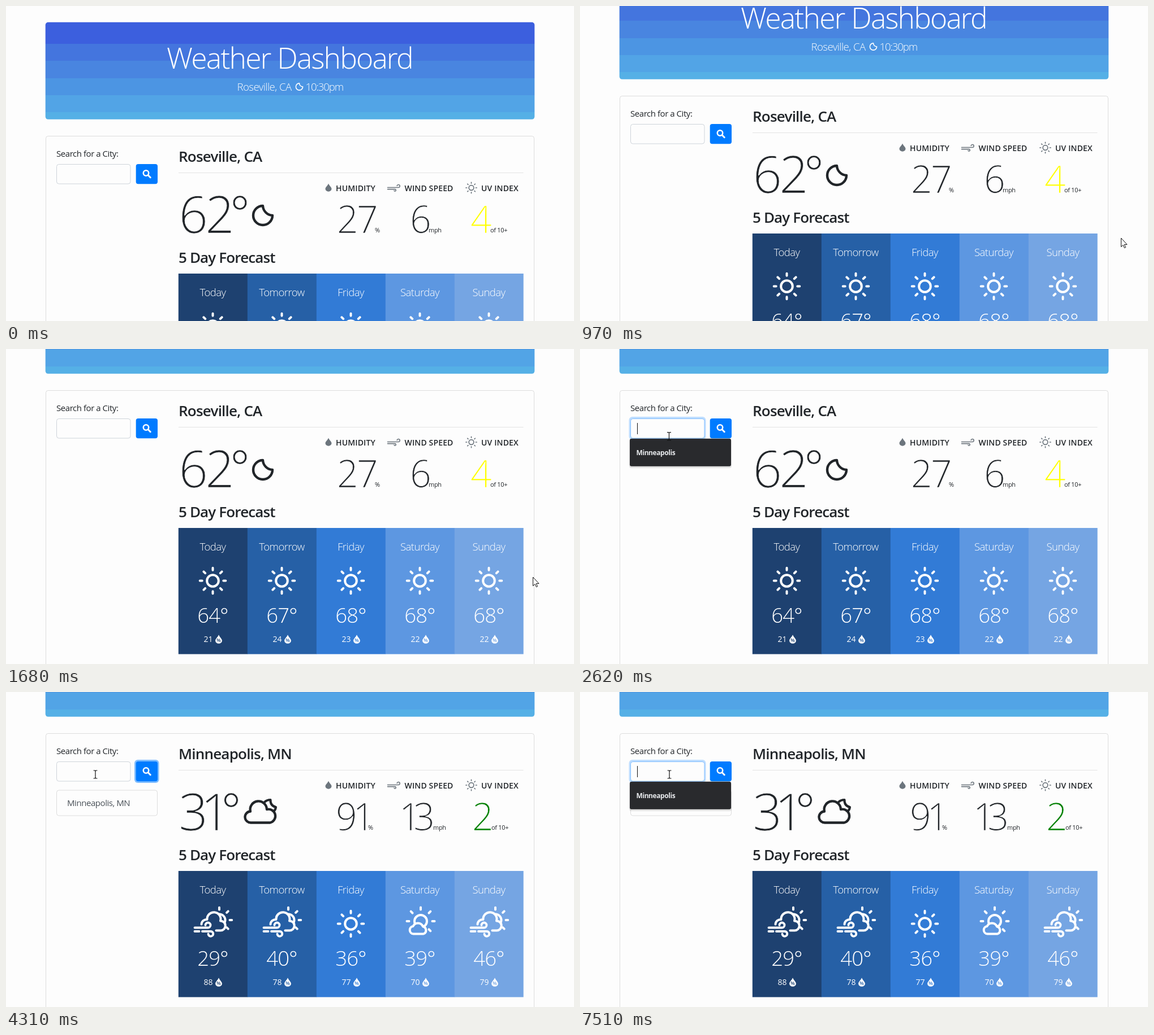
These frames come from a looping animation (1004x558 px, 8000 ms). An HTML page:

```html
<!DOCTYPE html>
<html lang="en">
<head>
<meta charset="utf-8">
<title>Weather Dashboard</title>
<style>
  html, body { margin: 0; width: 100%; height: 100%; overflow: hidden; background: #fdfdfd; }
  svg { display: block; width: 1004px; height: 558px; }
  text { font-family: "Open Sans", "Noto Sans", sans-serif; letter-spacing: -.03em; white-space: pre; }
  .line { fill: none; stroke-linecap: round; stroke-linejoin: round; }
  .thin text { stroke: #fdfdfd; stroke-width: .7px; }
  .off { display: none; }
</style>
</head>
<body>
<svg id="stage" viewBox="0 0 1004 558"></svg>
<script>
const LOOP = 8000;
const INK = '#212529', GREY = '#6c757d';
const COLS = ['#1e4170', '#2660a6', '#327bd6', '#5d97e1', '#75a5e3'];
const DAYS = ['Today', 'Tomorrow', 'Friday', 'Saturday', 'Sunday'];

const text = (x, y, str, size, o = {}) =>
  `<text x="${x}" y="${y}" font-size="${size}" font-weight="${o.w || 400}" fill="${o.fill || INK}"` +
  ` text-anchor="${o.mid ? 'middle' : 'start'}"${o.ls != null ? ` style="letter-spacing:${o.ls}em"` : ''}>${str}</text>`;
const line = (d, color, width = 4, fill = 'none') =>
  `<path class="line" d="${d}" stroke="${color}" stroke-width="${width}" style="fill:${fill}"/>`;
const at = (x, y, scale, body) => `<g transform="translate(${x} ${y}) scale(${scale})">${body}</g>`;
const box = (x, y, w, h, attrs) => `<rect x="${x}" y="${y}" width="${w}" height="${h}" ${attrs}/>`;

// Icons, each drawn around its own centre
const ring = r => `M${r} 0A${r} ${r} 0 1 1 ${-r} 0A${r} ${r} 0 1 1 ${r} 0Z`;
const rays = (angles, r0, r1) => angles.map(a => {
  const c = Math.cos(a * Math.PI / 180), s = Math.sin(a * Math.PI / 180);
  return `M${c * r0} ${s * r0}L${c * r1} ${s * r1}`;
}).join('');
const sun = color => line(ring(10.3) + rays([0, 45, 90, 135, 180, 225, 270, 315], 18.8, 22.8), color);
const moon = color => line('M0 -17A17 17 0 1 0 17 0A18 18 0 0 1 0 -17Z', color, 4.4);
const drop = color => `<path d="M0 -7.5C1.2 -4 5.8 -.5 5.8 2.4A5.8 5.3 0 0 1 -5.8 2.4C-5.8 -.5 -1.2 -4 0 -7.5Z" fill="${color}"/>`;
const cloudMoon = color =>
  line('M7 -16Q11 -20 17.5 -20Q17 -9.5 27 -7Q26.5 -2.5 23.5 0', color) +
  line('M-17 20.5A10 10 0 0 1 -18 .5A14.7 14.7 0 1 1 11 -3A12 12 0 0 1 17 20.5Z', color, 4.3);
const cloudSun = bg =>
  at(1.5, -4.5, 1, line(ring(11) + rays([0, 45, 180, 225, 270, 315], 20.5, 24.5), '#fff')) +
  line('M-11.5 18A6.8 6.8 0 0 1 -12 4.5A9.5 9.5 0 0 1 5.5 5A6.8 6.8 0 0 1 6.5 18Z', '#fff', 4, bg);
const windySun = bg =>
  at(11.5, -6.5, 1, line(ring(10.5) + rays([0, 45, 270, 315], 18.5, 22.2), '#fff')) +
  line('M6 12H14A8.5 8.5 0 0 0 13.5 -5A12 12 0 1 0 -10 -7.5A9 9 0 0 0 -20 1', '#fff', 4, bg) +
  line('M-32 7H-8.5A4.5 4.5 0 1 0 -13 2.5M-32 13.5H-24M-18.5 13.5H-3.5A4.4 4.4 0 1 1 -8 18', '#fff', 3.8);
const wind = color => line('M674.5 164.5H693.6A2.5 2.5 0 1 0 691.2 161.5M674.5 167.6H687.5A1.7 1.7 0 1 1 686 170', color, 1.6);

function current(d) {
  const num = (x, s, ls = 0, fill = INK) => text(x, 244.5, s, 66, { w: 300, ls, fill });
  return text(305, 119, d.city, 26, { w: 600 }) + d.icon +
    '<g class="thin">' + text(305.5, 244.5, d.temp, 90, { w: 300, ls: d.tempLs }) +
    text(d.degX, 241, '°', 84, { w: 300, ls: 0 }) +
    num(...d.hum) + num(...d.wind) + num(...d.uv) + '</g>' +
    text(d.units[0], 244, '%', 11) + text(d.units[1], 244, 'mph', 11) + text(d.units[2], 244, 'of 10+', 11);
}

function week(d) {
  return COLS.map((bg, i) => {
    const x = 365.5 + i * 122;
    return at(x, 410.5, 1, d.icons[i](bg)) +
      text(x, 485, d.temps[i] + '°', 36.5, { w: 300, fill: '#fff', mid: 1, ls: -.025 }) +
      text(x - 16, 518.5, d.hums[i], 14, { fill: '#fff', ls: 0 }) +
      at(x + 10.5, 514, 1.02, drop('#fff') + text(0, 5, '%', 8.5, { fill: bg, mid: 1, w: 600, ls: 0 }));
  }).join('');
}

const whiteSun = () => sun('#fff');
const before = {
  city: 'Roseville, CA', temp: '62', tempLs: -.05, degX: 395.5, icon: at(454, 214, 1, moon(INK)),
  hum: [585, '27', -.04], wind: [714, '6'], uv: [821, '4', 0, '#ff0'], units: [652, 747, 856],
  icons: Array(5).fill(whiteSun), temps: [64, 67, 68, 68, 68], hums: [21, 24, 23, 22, 22]
};
const after = {
  city: 'Minneapolis, MN', temp: '31', tempLs: -.14, degX: 380, icon: at(450, 211, 1, cloudMoon(INK)),
  hum: [583, '91', -.11], wind: [695, '13', -.19], uv: [824, '2', 0, 'green'], units: [640, 755, 858],
  icons: [windySun, windySun, whiteSun, cloudSun, windySun], temps: [29, 40, 36, 39, 46], hums: [88, 78, 77, 70, 79]
};

const bands = [['#3c5fde', 0], ['#4475de', .221], ['#4985e0', .398], ['#4c95e3', .576], ['#52a4e6', .75], ['#55b0e6', .927], ['', 1]];
const stops = bands.slice(0, -1).map(([c, o], i) =>
  `<stop offset="${o}" stop-color="${c}"/><stop offset="${bands[i + 1][1]}" stop-color="${c}"/>`).join('');

const header =
  box(69.7, -128.2, 864.6, 172, 'rx="4.8" fill="url(#sky)"') +
  text(501.5, -46, 'Weather Dashboard', 51.6, { w: 300, fill: '#fff', mid: 1, ls: -.036 }) +
  text(408.5, -7, 'Roseville, CA', 18.6, { w: 300, fill: '#fff', ls: -.03 }) +
  at(518.5, -14, .36, moon('#fff')) +
  text(529.5, -7, '10:30pm', 18.6, { w: 300, fill: '#fff', ls: -.06 });

const card =
  box(70.5, 73.5, 863, 640, 'rx="4" fill="#fdfdfd" stroke="#000" stroke-opacity=".125"') +
  text(89, 110, 'Search for a City:', 15) +
  box(305, 138, 609.5, 1, 'fill="#000" fill-opacity=".1"') +
  at(570, 164.5, .95, drop(GREY)) + wind(GREY) + at(822.5, 165, .42, sun(GREY)) +
  [[583, 'HUMIDITY'], [704.5, 'WIND SPEED'], [840, 'UV INDEX']].map(([x, s]) => text(x, 171, s, 14, { w: 600, ls: .01 })).join('') +
  text(305, 298, '5 Day Forecast', 26, { w: 600, ls: -.033 }) +
  COLS.map((c, i) => box(304.8 + i * 122, 317, i < 4 ? 122.4 : 121.9, 223.5, `fill="${c}"`) +
    text(365.5 + i * 122, 357, DAYS[i], 18.6, { w: 300, fill: '#fff', mid: 1 })).join('');

const search =
  `<g id="history">${box(89.5, 174, 178, 45, 'rx="4" fill="#fdfdfd" stroke="#000" stroke-opacity=".125"')}
    ${text(108, 202, 'Minneapolis, MN', 15, { fill: '#495057' })}</g>` +
  box(86.5, 120, 136, 41, 'id="inputRing" rx="6" fill="#bfdeff"') +
  box(89.5, 123.5, 130.5, 34.5, 'id="input" rx="4"') +
  `<g id="value">${text(100.5, 147, 'Minneapolis', 15)}</g>` +
  box(0, 131, 1, 20, 'id="caret" fill="#111"') +
  box(227, 120, 43.5, 41, 'id="btnRing" rx="6" fill="#7fbdff"') +
  box(229.7, 123, 38.3, 35.2, 'id="btn" rx="4"') +
  '<circle cx="247.5" cy="139" r="4.7" fill="none" stroke="#fff" stroke-width="2.6"/>' +
  line('M251.3 142.8L255.2 146.7', '#fff', 3) +
  `<g id="list">${box(87, 160, 181, 51, 'rx="4" fill="#000" fill-opacity=".1"')}
    ${box(88, 158.8, 179, 48.9, 'rx="3" fill="#292a2d"')}
    ${box(88, 167.5, 179, 32.5, 'id="pick" fill="#3f4042"')}
    ${text(99.5, 188, 'Minneapolis', 12, { w: 700, fill: '#e8eaed', ls: -.035 })}</g>`;

const pointers =
  `<g id="arrow">${line('M.5 .5V15.6L4 12.4L6.4 17.6L8.6 16.6L6.2 11.5H10.6Z', '#111', 1, '#fff')}</g>
   <g id="hand">${line('M-1.6 12V.6a1.6 1.6 0 0 1 3.2 0V7l6.6 1.6q1.4 .5 1.2 2l-1 7q-.4 3-3 3.3H1.4q-1.5-.2-2.5-2L-4.8 12.6q.8-2 3.2-.6Z', '#111', 1.1, '#fff')}</g>
   <g id="beam">${line('M-3 -7H-1L0 -6L1 -7H3M0 -6V6M-3 7H-1L0 6L1 7H3', '#111', 1.2)}</g>`;

document.getElementById('stage').innerHTML =
  `<defs><linearGradient id="sky" x2="0" y2="1">${stops}</linearGradient></defs>
   <g id="page">${header}${card}
     <g id="now0">${current(before)}</g><g id="now1">${current(after)}</g>
     <g id="week0">${week(before)}</g><g id="week1">${week(after)}</g>${search}</g>
   <g id="pointer">${pointers}</g>`;

const $ = id => document.getElementById(id);
const show = (id, on) => $(id).classList.toggle('off', !on);
const within = (t, a, b) => t >= a && t < b;

// [time, offset]
const SCROLL = [[0, 157], [920, 145], [970, 86], [1050, 32], [1130, 8], [1200, 0]];
// [start, end, steps, x0, y0, x1, y1]
const MOVES = [
  [430, 760, 4, 988, 542, 956, 411],
  [1680, 2440, 10, 931, 404, 158, 143],
  [2520, 2850, 4, 157, 150, 160, 180],
  [3000, 3300, 4, 170, 176, 248, 140],
  [4010, 4310, 4, 240, 142, 158, 146]
];

function pointerAt(t) {
  const m = MOVES.filter(m => t >= m[0]).pop();
  if (!m) return null;
  const [a, b, n, x0, y0, x1, y1] = m;
  const p = Math.min(n, Math.floor((t - a) / (b - a) * n + .01)) / n;
  const e = p * p * (3 - 2 * p);
  return [x0 + (x1 - x0) * e, y0 + (y1 - y0) * e];
}

function render(t) {
  const y = SCROLL.filter(s => t >= s[0]).pop()[1];
  $('page').setAttribute('transform', `translate(0 ${y})`);

  const pos = pointerAt(t);
  show('pointer', pos);
  let overBtn = false;
  if (pos) {
    const [px, py] = pos;
    const row = within(py, 123, 159);
    overBtn = row && within(px, 230, 268);
    const overInput = row && within(px, 89, 221);
    $('pointer').setAttribute('transform', `translate(${px} ${py})`);
    show('hand', overBtn);
    show('beam', overInput);
    show('arrow', !overBtn && !overInput);
  }

  const filled = within(t, 2680, 3610);
  const focus = within(t, 2360, 3460) || t >= 5400;
  show('inputRing', focus);
  $('input').setAttribute('fill', filled ? '#e8f0fe' : '#fdfdfd');
  $('input').setAttribute('stroke', focus ? '#80bdff' : '#ced4da');
  show('value', filled);
  show('caret', focus && !within(t, 5950, 6410) && !within(t, 6960, 7510));
  $('caret').setAttribute('x', filled ? 181.3 : 101);
  show('btnRing', within(t, 3460, 5400));
  $('btn').setAttribute('fill', overBtn ? '#0069d9' : '#007bff');

  show('list', within(t, 2440, 3380) || t >= 5470);
  $('list').setAttribute('opacity', within(t, 3000, 3380) ? [.6, .3, .12, .06, .025][Math.min(4, Math.floor((t - 3000) / 75))] : 1);
  show('pick', within(t, 2680, 3380));

  const newTop = t >= 3690, newWeek = t >= 4010;
  show('now0', !newTop);
  show('now1', newTop);
  show('week0', !newWeek);
  show('week1', newWeek);
  show('history', newWeek);
}

const start = performance.now();
function tick() {
  render((performance.now() - start) % LOOP);
  requestAnimationFrame(tick);
}
tick();
</script>
</body>
</html>
```
